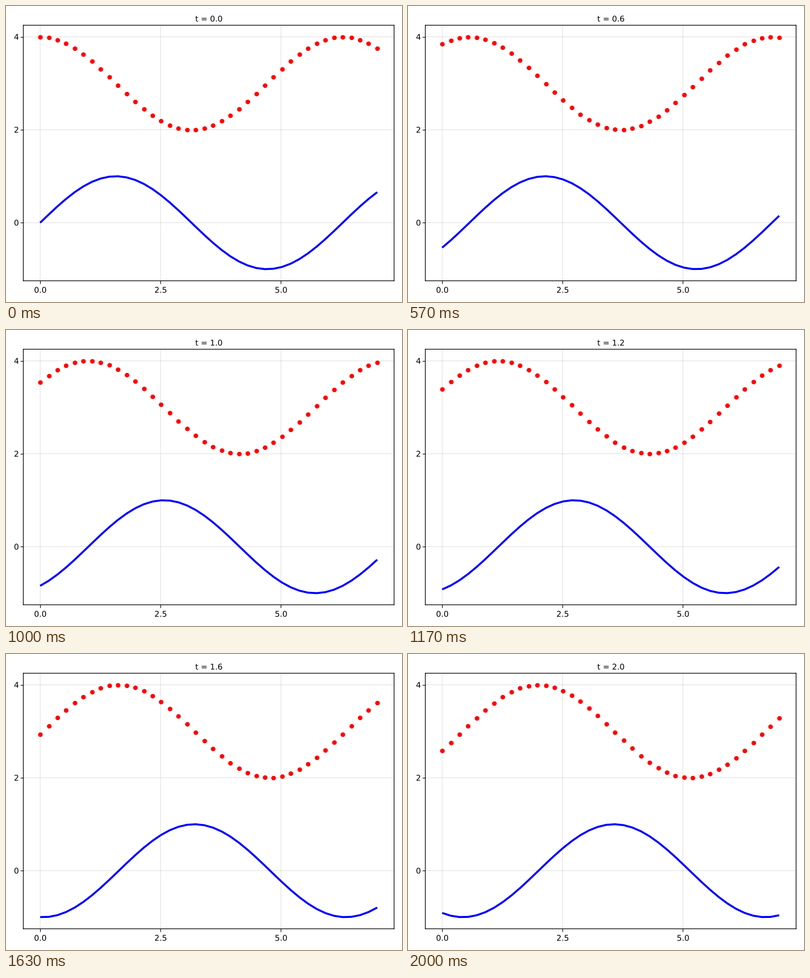
Write a matplotlib script that moves like this. It is 800x600 px and loops after 2030 ms.

```python
import matplotlib.pyplot as plt
import numpy as np
from matplotlib.animation import FuncAnimation
from matplotlib.patches import PathPatch
from matplotlib.textpath import TextPath

W, H, DPI = 800, 600, 100
PX = 72 / DPI  # points per pixel
LEFT, RIGHT, TOP, BOTTOM = 35, 784, 39, 557
FONT_SIZE = 16
LOOP_MS, TICK_MS, FPS = 2030, 10, 30

plt.rcParams["path.snap"] = False
plt.rcParams["font.family"] = "DejaVu Sans"

fig = plt.figure(figsize=(W / DPI, H / DPI), dpi=DPI, facecolor="white")

# Plot area
ax = fig.add_axes([LEFT / W, 1 - BOTTOM / H, (RIGHT - LEFT) / W, (BOTTOM - TOP) / H])
ax.set(xlim=(-0.35, 7.35), ylim=(-1.25, 4.25), xticks=[0, 2.5, 5], yticks=[0, 2, 4])
ax.set_axisbelow(True)
ax.grid(color="black", alpha=0.12, linewidth=1.2 * PX)
ax.tick_params(length=6 * PX, width=1.3 * PX, color="black",
               labelbottom=False, labelleft=False)
for spine in ax.spines.values():
    spine.set_linewidth(1.4 * PX)

# Pixel layer for the lettering, origin at the bottom left
stage = fig.add_axes([0, 0, 1, 1], xlim=(0, W), ylim=(0, H))
stage.axis("off")


def outline(x, y, text):
    """Text outline starting at x with its baseline y pixels from the top."""
    return TextPath((x, H - y), text, size=FONT_SIZE)


def add_text(x, y, text):
    patch = PathPatch(outline(x, y, text), facecolor="black", linewidth=0)
    return stage.add_patch(patch)


def to_px(x, y):
    px, py = ax.transData.transform((x, y))
    return px, H - py


for v in (0, 2.5, 5):
    add_text(to_px(v, 0)[0] - 12.4, 581.2, f"{v:.1f}")
for v in (0, 2, 4):
    add_text(16, to_px(0, v)[1] + 5.8, str(v))

TITLE_POS = 382.3, 31.5
title = add_text(*TITLE_POS, "t = 0.0")

# Waves
xs = np.linspace(0, 7, 40)
line, = ax.plot(xs, np.sin(xs), color="blue", linewidth=4 * PX,
                solid_capstyle="butt", solid_joinstyle="miter")
dots, = ax.plot(xs, np.cos(xs) + 3, "o", color="red",
                markersize=9.3 * PX, markeredgewidth=0)


def update(i):
    t = int((i + 0.5) * TICK_MS * FPS / 1000) / FPS
    line.set_ydata(np.sin(xs - t))
    dots.set_ydata(np.cos(xs - t) + 3)
    title.set_path(outline(*TITLE_POS, f"t = {t:.1f}"))
    return line, dots, title


anim = FuncAnimation(fig, update, frames=LOOP_MS // TICK_MS, interval=TICK_MS,
                     repeat=True, repeat_delay=0)
plt.show()
```
